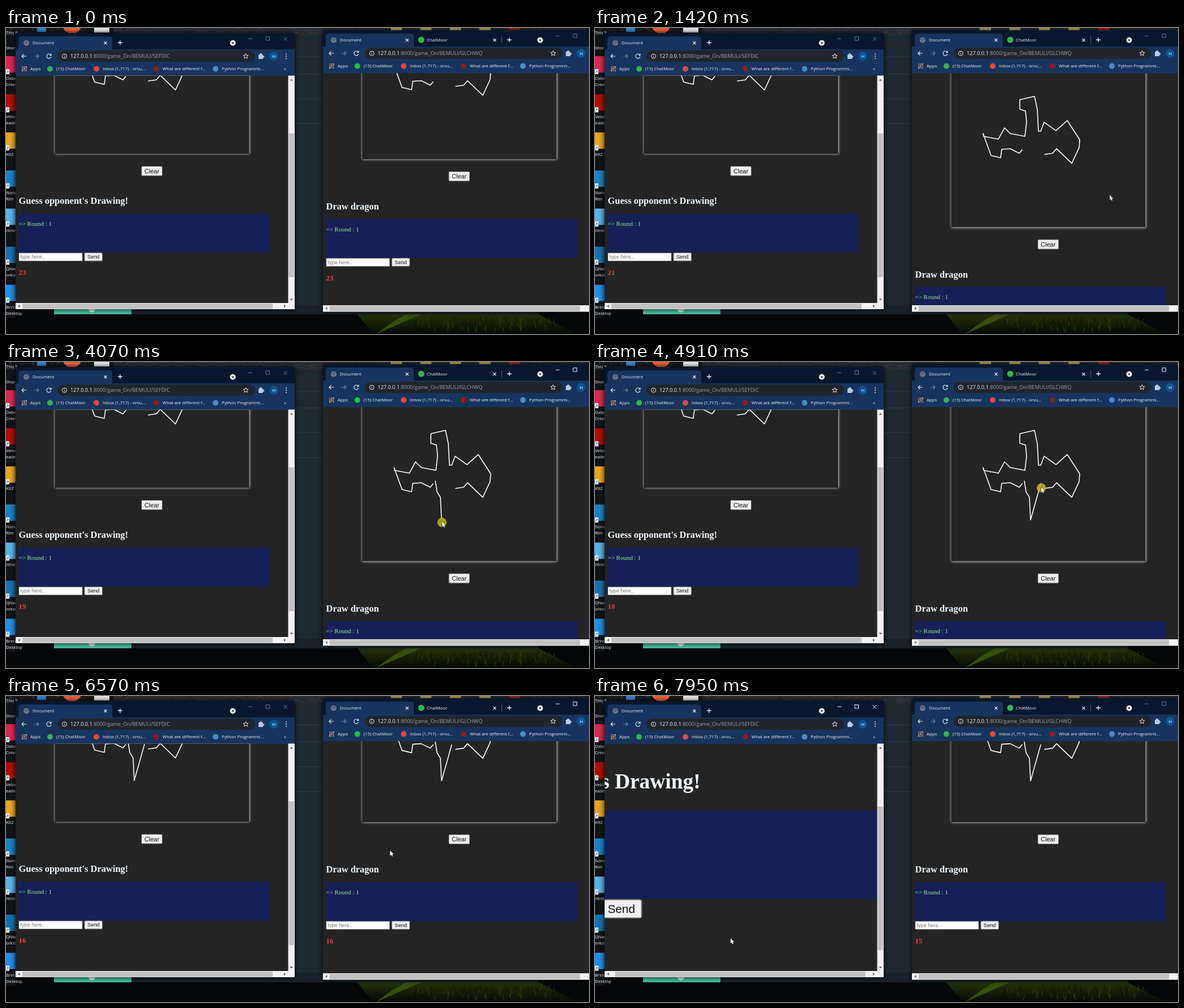
An HTML page with a canvas that plays this animation: 1032 by 543 pixels, repeating every 7.99 s.

```html
<!DOCTYPE html>
<html lang="en">
<head>
<meta charset="utf-8">
<title>Drawing game</title>
<style>
html, body { margin: 0; height: 100%; overflow: hidden; background: #000; }
canvas { display: block; }
</style>
</head>
<body>
<canvas id="stage" width="1032" height="543"></canvas>
<script>
const ctx = document.getElementById('stage').getContext('2d');
const LOOP = 7990;
const UI = '"Open Sans", sans-serif';
const SERIF = '"Liberation Serif", serif';
const SANS = '"Liberation Sans", sans-serif';
const RIGHT_X = 544;
const DRAW_START = 2970, DRAW_END = 4900;
const FOCUS_RIGHT = 2520, FOCUS_LEFT = 7710;

// Each glide carries the pointer to a new resting place
const glides = [
  { from: 190, to: 620, x: 910, y: 331 },
  { from: 900, to: 980, x: 911, y: 296 },
  { from: 1500, to: 1940, x: 764, y: 221 },
  { from: 2010, to: 2210, x: 761, y: 217 },
  { from: DRAW_START, to: 3150, x: 764, y: 236 },
  { from: 3160, to: 3430, x: 770, y: 246 },
  { from: 3670, to: 4150, x: 772, y: 286 },
  { from: 4150, to: DRAW_END, x: 790, y: 222 },
  { from: 5350, to: 5800, x: 724, y: 367 },
  { from: 6150, to: 6950, x: 642, y: 195 },
  { from: 6980, to: 7460, x: 240, y: 430 }
];
const dragon = new Path2D('M756 217L751 223 735 215 720 216 718 231 701 227 687 188' +
  ' 688 193 714 198 725 178 735 188 761 193 764 168 762 148 752 145 752 128 778 122' +
  ' 783 146 785 184 789 184 795 168 816 183 836 165 858 199 857 213 844 241 817 215' +
  ' 810 223 796 225');

const progress = (t, from, to) => Math.min(1, Math.max(0, (t - from) / (to - from)));
function ease(t, from, to) {
  const p = progress(t, from, to);
  return p * p * (3 - 2 * p);
}
function pointerAt(t) {
  let x = 975, y = 546;
  for (const g of glides) {
    const p = ease(t, g.from, g.to);
    x += (g.x - x) * p;
    y += (g.y - y) * p;
  }
  return [x, y];
}
const rightPageOffset = t =>
  9.5 + 120.7 * ease(t, 1210, 1420) - 129.6 * ease(t, 5830, 6116);

function seededRandom(seed) {
  return () => (seed = seed * 16807 % 2147483647) / 2147483647;
}

function rect(x, y, w, h, color) {
  ctx.fillStyle = color;
  ctx.fillRect(x, y, w, h);
}
function round(x, y, w, h, r, color) {
  ctx.fillStyle = color;
  ctx.beginPath();
  ctx.roundRect(x, y, w, h, r);
  ctx.fill();
}
function disc(x, y, r, color) {
  ctx.fillStyle = color;
  ctx.beginPath();
  ctx.arc(x, y, r, 0, 7);
  ctx.fill();
}
function line(d, color, width = 1) {
  ctx.strokeStyle = color;
  ctx.lineWidth = width;
  ctx.stroke(new Path2D(d));
}
function shape(d, color) {
  ctx.fillStyle = color;
  ctx.fill(new Path2D(d));
}
function text(s, x, y, font, color) {
  ctx.font = font;
  ctx.fillStyle = color;
  ctx.fillText(s, x, y);
}
function scoped(fn) {
  ctx.save();
  fn();
  ctx.restore();
}
function clip(x, y, w, h) {
  ctx.beginPath();
  ctx.rect(x, y, w, h);
  ctx.clip();
}

function wallpaper() {
  const random = seededRandom(7);
  rect(0, 0, 1032, 543, '#050607');
  rect(0, 0, 1032, 14, '#2a2d31');
  rect(0, 0, 190, 14, '#15181b');
  rect(0, 14, 17, 500, '#111417');
  for (let i = 0; i < 300; i++) {
    rect(random() * 1032, random() * 13, 3, 1, random() < 0.5 ? '#15181b' : '#44484e');
  }

  const meadow = ctx.createLinearGradient(0, 508, 0, 543);
  meadow.addColorStop(0, '#22330a');
  meadow.addColorStop(1, '#050803');
  shape('M622 508H943L1010 543H650Z', meadow);
  shape('M655 543L735 508H708L684 522Z', '#34500a');
  for (let i = 0; i < 90; i++) {
    const x = 725 + random() * 250;
    line(`M${x} ${512 + random() * 20}l${random() * 8 - 4} 9`, random() < 0.6 ? '#0a1004' : '#2e4509');
  }
}

function backWindow() {
  rect(85, 13, 858, 495, '#1d2a32');
  rect(222, 491, 721, 17, '#17222a');
  for (const y of [51, 81, 125, 169]) rect(511, y, 50, 1, '#2d3b43');
  rect(85, 498, 137, 10, '#45c09e');
  disc(152, 498, 6.5, '#e8f4f0');
}

function desktopIcons() {
  const font = '7.5px ' + UI, white = '#f2f2f2';
  rect(55, 0, 16, 7, '#2e8ad0');
  disc(117, -7, 17, '#f2613a');
  rect(156, 0, 27, 8, '#eceff2');
  for (let i = 0; i < 5; i++) {
    rect(681 + 52.3 * i, 0, 20, 4, i === 4 ? '#b52b26' : '#d6b75d');
  }

  text('This P', 0, 11, font, white);
  text('Short', 0, 38, font, white);
  const shortcuts = [
    ['#e0254c', 'Oxbe', 'Creat'], ['#b30b00', 'Velor', 'eader'], ['#eba51d', 'KitZ', ''],
    ['#1583ca', 'Norvel', 'Rim'], ['#54b4ec', 'ntrol', ''], ['#1273b5', 'QNwo', 'orkst'],
    ['#1c90ed', 'Brim', 'Desktop']
  ];
  shortcuts.forEach(([color, top, bottom], i) => {
    const y = 50 + 67.6 * i;
    rect(0, y, 17, 29, color);
    rect(0, y + 23, 6, 9, '#f1f3f5');
    line(`M1 ${y + 30}L4 ${y + 26}M2 ${y + 26}H4V${y + 28}`, '#1769b0');
    text(top, 0, y + 42, font, white);
    text(bottom, 0, y + 53, font, white);
  });
}

function star(x, y, r, color) {
  let d = 'M';
  for (let i = 0; i < 10; i++) {
    const a = Math.PI * (i / 5 - 0.5), size = i % 2 ? r * 0.45 : r;
    d += `${x + size * Math.cos(a)} ${y + size * Math.sin(a)} `;
  }
  line(d + 'Z', color);
}

function tabStrip(tabEnd, captionColor, secondTab) {
  const white = '#f0f3f6';
  const cross = x => line(`M${x - 2.5} 24l5 5m0-5l-5 5`, white, 1.1);
  round(22, 15, tabEnd - 22, 26, [5, 5, 0, 0], '#17345e');
  disc(36, 26.5, 5, '#6f7b88');
  line('M32 25l3 1 1 3M36 22l1 3 3 1', '#354c6b', 1.2);
  text('Document', 47, 29, '7.8px ' + UI, white);
  cross(tabEnd - 12);
  if (secondTab) {
    disc(191, 26, 5.5, '#2ab944');
    text('ChatMoor', 201, 29, '7.8px ' + UI, white);
    cross(321);
    rect(333, 20, 1, 12, '#526277');
  }
  line(`M${secondTab ? 343 : 198} 26h8m-4-4v8`, white, 1.3);
  disc(401.5, 26.5, 5, '#f1f3f4');
  shape('M399 25.5h5l-2.5 3z', '#15263e');
  line('M429 19h7M460 15.5h6.5v6.5h-6.5zM491.500 16l6.500 6.500m0-6.500l-6.500 6.500'.replaceAll('00', ''), captionColor);
}

function addressBar(code) {
  const white = '#e4e9ef', font = '9.16px ' + UI;
  line('M36 50h-8m3.5-3.5l-3.5 3.5 3.5 3.5', white, 1.2);
  line('M50 50h8m-3.5-3.5l3.5 3.5-3.5 3.5', '#71859f', 1.2);
  line('M79.5 48a4 4 0 1 0 .4 3M80 45.5v3h-3', white, 1.2);
  round(91, 40, 350, 20, 10, '#20252b');
  line('M99.5 50a4 4 0 1 0 8 0a4 4 0 1 0-8 0M103.5 49.5v2.5M103.5 47.2v1', white);
  const host = '127.0.0.1';
  text(host, 114, 53.3, font, '#f4f5f6');
  text(':8000/game_On/BEMULI/' + code, 114 + ctx.measureText(host).width, 53.3, font, '#9ba2a9');
  star(424.5, 50, 4.7, white);
  round(447, 47, 8, 8, 1, '#b9cbe2');
  disc(451, 46.5, 1.8, '#b9cbe2');
  disc(455.5, 51, 1.8, '#b9cbe2');
  disc(474, 50, 7.7, '#0b5596');
  text('H', 471.2, 53, '8px ' + UI, '#fff');
  for (const y of [46, 50, 54]) disc(496, y, 1, white);
}

function bookmarkBar() {
  const dots = ['#e44b3d', '#4f9ded', '#f0be32'];
  for (let i = 0; i < 9; i++) {
    const row = Math.floor(i / 3);
    rect(28 + i % 3 * 3.3, 68 + row * 3.3, 2.3, 2.3, dots[(i + row) % 3]);
  }
  const bookmarks = [
    ['Apps', 43], ['(15) ChatMoor', 89, '#2ab944'], ['Inbox (1,717) - orvu...', 171, '#e2483c'],
    ['What are different f...', 277, '#8d1b1b'], ['Python Programmi...', 382, '#4b8bc0'], ['»', 492]
  ];
  for (const [label, x, color] of bookmarks) {
    if (color) disc(x - 11, 72.5, 5, color);
    text(label, x, 75.3, '7.75px ' + UI, '#f0f3f6');
  }
}

// Browser frame in left-window coordinates
function browser(code, width, tabEnd, active, secondTab) {
  rect(17, 9, width, 30, '#08172e');
  rect(17, 38, width, 47, '#17345e');
  tabStrip(tabEnd, active ? '#f4f6f8' : '#69778b', secondTab);
  addressBar(code);
  bookmarkBar();
}

function button(label, x, y, w, h, size) {
  round(x, y, w, h, 1.5, '#efefef');
  ctx.strokeStyle = '#767676';
  ctx.lineWidth = 0.8;
  ctx.stroke();
  ctx.textAlign = 'center';
  text(label, x + w / 2, y + h / 2 + size * 0.36, size + 'px ' + SANS, '#111');
  ctx.textAlign = 'left';
}

// The pen follows the pointer, slightly above its tip
function newStroke(t) {
  const end = Math.min(t, DRAW_END);
  ctx.beginPath();
  for (let time = DRAW_START; time < end + 20; time += 20) {
    const [x, y] = pointerAt(Math.min(time, end));
    ctx.lineTo(x - 1, y - 5);
  }
  ctx.stroke();
}

function page(title, count, t, showStroke) {
  scoped(() => {
    ctx.shadowColor = '#fff';
    ctx.shadowBlur = 4;
    rect(86.5, -200, 344, 423.3, '#242424');
  });
  scoped(() => {
    ctx.translate(-RIGHT_X, -131);
    ctx.strokeStyle = '#fff';
    ctx.lineWidth = 1.6;
    ctx.lineJoin = ctx.lineCap = 'round';
    ctx.stroke(dragon);
    if (showStroke) newStroke(t);
  });
  button('Clear', 240, 245.5, 36.5, 16.5, 11);
  text(title, 22.5, 312.3, 'bold 16.47px ' + SERIF, '#f0f8ff');
  rect(22.5, 329.5, 445, 69, '#172056');
  text('=> Round : 1', 22.5, 351, '10.98px ' + SERIF, '#90ee90');
  rect(22.5, 398.8, 113, 15, '#767676');
  rect(23.3, 399.6, 111.4, 13.4, '#fff');
  text('type here..', 25.5, 409, '9.15px ' + SANS, '#757575');
  button('Send', 139, 399, 31.5, 14.3, 9.15);
  text(count, 22.5, 438.3, 'bold 12.85px ' + SERIF, '#ee3b3f');
}

function windowBody(x, y, w, h) {
  scoped(() => {
    ctx.shadowColor = '#000';
    ctx.shadowBlur = 9;
    rect(x, y, w, h, '#242424');
  });
}

function leftWindow(t, count) {
  const pinch = progress(t, 7770, 7950), zoom = 2.275 ** pinch;
  windowBody(17, 9, 494, 490);
  browser('SEFDIC', 494, 188, t >= FOCUS_LEFT, false);
  scoped(() => {
    clip(17, 84.5, 482.5, 403.5);
    ctx.translate(239.5, 428.5);
    ctx.scale(zoom, zoom);
    ctx.translate(-239.5, -428.5);
    page("Guess opponent's Drawing!", count, t, t >= 6300);
  });
  rect(499.5, 84.5, 11.5, 414.5, '#f1f1f1');
  rect(17, 488, 494, 11, '#f1f1f1');
  rect(500.5, 187 + 9 * pinch, 9.5, 255, '#c1c1c1');
  rect(29 + 6.5 * pinch, 489, 443, 9.5, '#c1c1c1');
  shape('M502.8 93.5h5l-2.5-3zM502.8 480.5h5l-2.5 3z', '#505050');
  shape('M24.5 491v5l-3-2.5zM492 491v5l3-2.5z', '#505050');
}

function rightWindow(t, count) {
  windowBody(561, 4, 480, 500);
  scoped(() => {
    ctx.translate(RIGHT_X, -5);
    browser('GLCHWQ', 480, 178, t >= FOCUS_RIGHT && t < FOCUS_LEFT, true);
  });
  scoped(() => {
    clip(561, 80, 471, 412);
    ctx.translate(RIGHT_X, rightPageOffset(t));
    page('Draw dragon', count, t, t > DRAW_START);
  });
  rect(561, 492, 471, 11.5, '#f1f1f1');
  rect(573, 493, 443, 9.5, '#c1c1c1');
  shape('M568.5 495v5l-3-2.5z', '#505050');
}

function drawPointer(t) {
  const [x, y] = pointerAt(t);
  if (t >= FOCUS_RIGHT && t < 5350) disc(x, y + 1.5, 8.3, 'rgba(190,180,20,.85)');
  scoped(() => {
    ctx.translate(x, y);
    const arrow = 'M0 0V9L2 7.2 3.5 10.5 5 9.8 3.6 6.6H6.5Z';
    line(arrow, '#111');
    shape(arrow, '#fff');
  });
}

function draw(t) {
  const count = 23 - Math.floor((t + 620) / 1000);
  wallpaper();
  backWindow();
  desktopIcons();
  leftWindow(t, count);
  rightWindow(t, count);
  drawPointer(t);
}

const start = performance.now();
function tick() {
  draw((performance.now() - start) % LOOP);
  requestAnimationFrame(tick);
}
tick();
</script>
</body>
</html>
```
